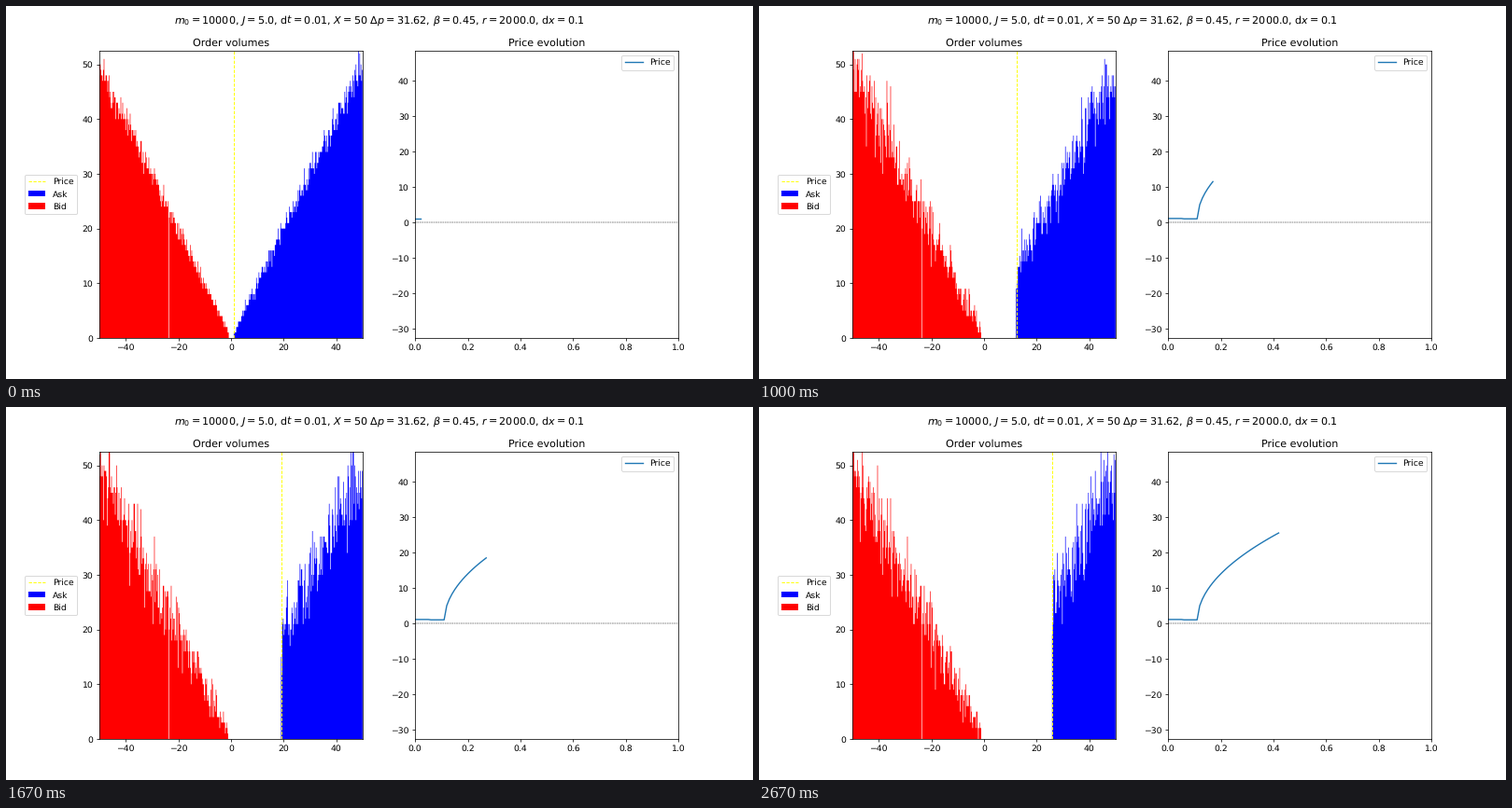
Recreate the animation shown at these times as a matplotlib script. Size 800x400 px, loop 3.01 s.

```python
import numpy as np
import matplotlib.pyplot as plt
from matplotlib.animation import FuncAnimation

LOOP_MS = 3010
TICK_MS = 35
HOLD_MS = 1000 / 3  # time each state of the book stays on screen
STATES = 9
STEPS = 5           # time steps per state
DT = 0.01
COLS = 423          # fine columns, about 2/3 of a pixel wide
GAP = 111           # empty column in the bid side

plt.rcParams["text.hinting"] = "none"

rng = np.random.default_rng(7)
edges = np.linspace(-50, 50, COLS + 1)
centers = (edges[:-1] + edges[1:]) / 2
depth = np.abs(centers)


def price(step):
    """Flat at first, then square-root impact once the order starts."""
    step = np.asarray(step)
    calm = np.where(step < 6, 1.2, 1.1)
    impact = 0.6 + 44.9 * np.sqrt(np.maximum(step - 11, 0) * DT)
    return np.where(step > 11, impact, calm)


def noise_walk():
    """Mean-reverting fluctuations that widen from state to state."""
    w = 0.25 * rng.standard_normal(COLS)
    walk = [w]
    for _ in range(STATES - 1):
        w = 0.9 * w + 0.32 * rng.standard_normal(COLS)
        walk.append(w)
    return walk


volumes = [np.maximum(np.round(depth + np.sqrt(depth) * w), 0)
           for w in noise_walk()]


def book(k):
    """Bid and ask columns and the current price."""
    p = float(price(2 + STEPS * k + 1))
    bid = np.where(centers < -0.8, volumes[k], 0)
    bid[GAP] = 0
    ask = np.where(centers >= p - 0.2, volumes[k], 0)
    first = np.argmax(centers >= p - 0.2)
    ask[first:first + 2] = np.round(0.65 * ask[first:first + 2])
    return bid, ask, p


fig, (ax_book, ax_price) = plt.subplots(1, 2, figsize=(12, 6), dpi=200 / 3)
fig.suptitle(r"$m_0=10000$, $J=5.0$, d$t=0.01$, $X=50$ $\Delta p=31.62$, "
             r"$\beta=0.45$, $r=2000.0$, d$x=0.1$")

bid0, ask0, p0 = book(0)
asks = ax_book.stairs(ask0, edges, fill=True, color="blue", label="Ask",
                      snap=False)
bids = ax_book.stairs(bid0, edges, fill=True, color="red", label="Bid",
                      snap=False)
marker = ax_book.axvline(p0, color="yellow", ls="--", lw=1, label="Price")
ax_book.set(title="Order volumes", xlim=(-50, 50), ylim=(0, 52.5))
ax_book.legend(handles=[marker, asks, bids], loc="center left",
               bbox_to_anchor=(-0.3, 0.5))

curve, = ax_price.plot([], [], label="Price")
ax_price.axhline(0, color="black", ls="--", lw=0.5)
ax_price.set(title="Price evolution", xlim=(0, 1), ylim=(-32.5, 48.5))
ax_price.legend(loc="upper right")


def update(n):
    k = min(int((n + 1) * TICK_MS / HOLD_MS), STATES - 1)
    bid, ask, p = book(k)
    bids.set_data(bid)
    asks.set_data(ask)
    marker.set_xdata([p, p])
    steps = np.arange(3 + STEPS * k)
    curve.set_data(steps * DT, price(steps))
    return bids, asks, marker, curve


anim = FuncAnimation(fig, update, frames=LOOP_MS // TICK_MS, interval=TICK_MS,
                     repeat=True, repeat_delay=0)
plt.show()
```
